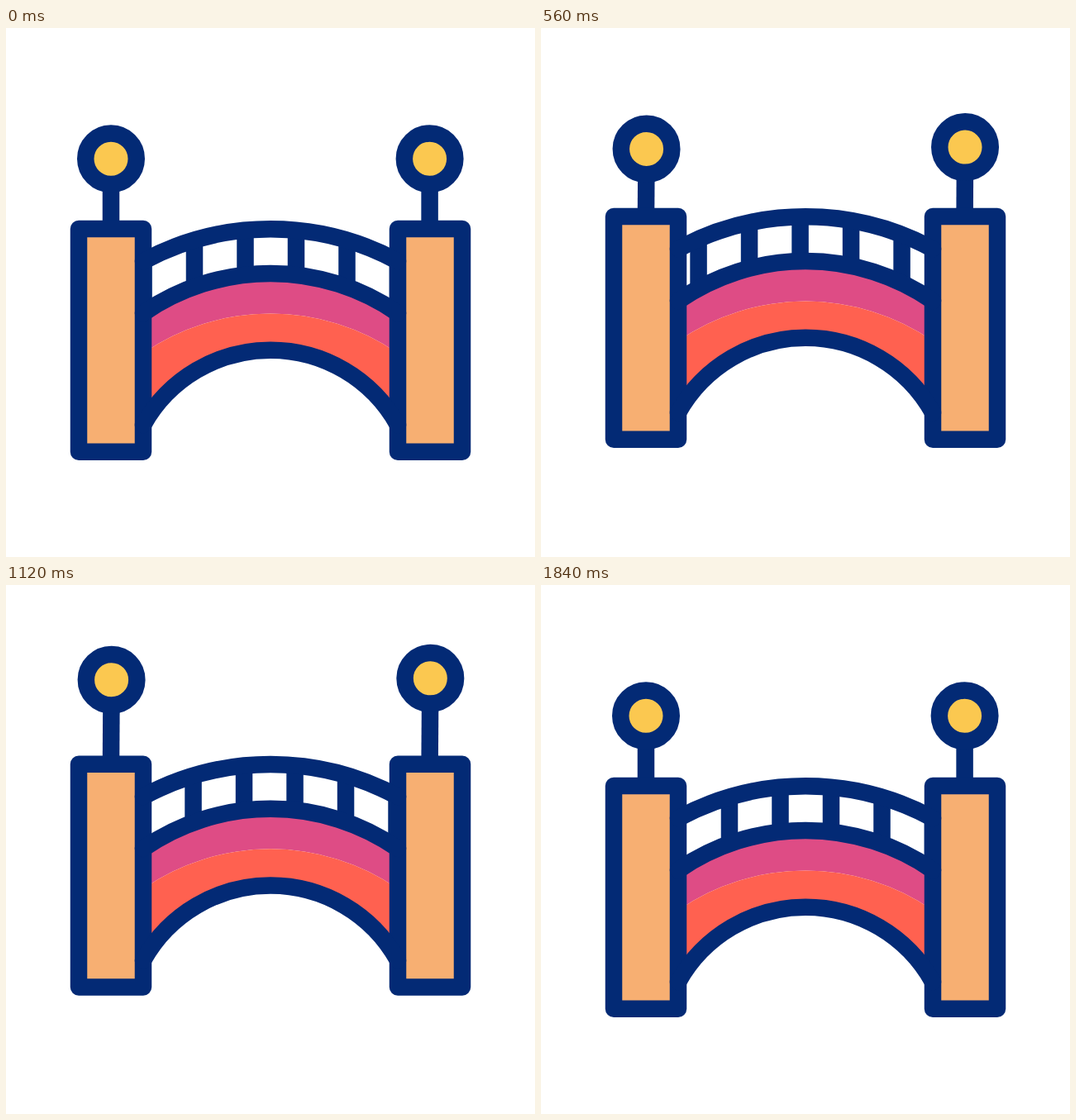
These frames come from a looping animation (640 by 640 pixels, 1880 ms). An HTML page:

```html
<!DOCTYPE html>
<html lang="en">
<head>
<meta charset="utf-8">
<title>Bridge</title>
<style>
html, body { margin: 0; width: 100%; height: 100%; overflow: hidden; background: #fff; }
svg { display: block; width: 100%; height: 100%; }
.line { fill: none; stroke: #032a75; stroke-width: 20.5; stroke-linecap: round; stroke-linejoin: round; }
.bar { stroke-linecap: butt; }
</style>
</head>
<body>
<svg viewBox="0 0 640 640">
  <g id="bridge">
    <g class="lamp"></g>
    <g class="lamp"></g>
    <path id="pink" fill="#de4c85"/>
    <path id="red" fill="#ff6150"/>
    <path id="bars" class="line bar"/>
    <g id="pillars"></g>
    <path id="arcs" class="line"/>
  </g>
</svg>
<script>
const LOOP = 1880, STEP = 40;
const LEFT = 166, RIGHT = 474, MID = 320;
const GAP = 61.5, BAR_STEPS = 4, LIFT = 27;
const LAMP_Y = 158.2, LAMP_BASE = 243, LAMP_LAG = 100;
const find = id => document.getElementById(id);

// Circular arcs, given by the top of the curve and the radius.
const rail = { top: 243.2, r: 323.6 };
const deck = { top: 297, r: 271 };
const stripe = { top: 345.5, r: 271 };
const base = { top: 389.7, r: 176.3 };
const arcY = (arc, x) => arc.top + arc.r - Math.sqrt(arc.r ** 2 - (x - MID) ** 2);
const arcTo = (arc, x, sweep) => `A${arc.r} ${arc.r} 0 0 ${sweep} ${x} ${arcY(arc, x)}`;
const arcPath = arc => `M${LEFT} ${arcY(arc, LEFT)}${arcTo(arc, RIGHT, 1)}`;
const band = (upper, lower) =>
  `${arcPath(upper)}L${RIGHT} ${arcY(lower, RIGHT)}${arcTo(lower, LEFT, 0)}Z`;

find('pink').setAttribute('d', band(deck, stripe));
find('red').setAttribute('d', band(stripe, base));
find('arcs').setAttribute('d', [rail, deck, base].map(arcPath).join(''));
find('pillars').innerHTML = [88, 474].map(x =>
  `<rect class="line" x="${x}" y="243" width="78" height="269.7" style="fill:#f7af72"/>`).join('');

const lamps = [...document.querySelectorAll('.lamp')].map((group, i) => {
  group.innerHTML = '<path class="line bar"/><circle class="line" r="30.75" style="fill:#fbc850"/>';
  return { group, x: [127, 512.6][i], lag: i * LAMP_LAG, stem: group.firstChild, ball: group.lastChild };
});

const progress = (t, from, to) => Math.min(1, Math.max(0, (t - from) / (to - from)));
const easePower = (u, n) => u < .5 ? (2 * u) ** n / 2 : 1 - (2 - 2 * u) ** n / 2;
const smooth = (t, from, to) => {
  const u = progress(t, from, to);
  return u * u * (3 - 2 * u);
};

// Dip, spring up, settle.
const hop = t => 5.2 * smooth(t, 380, 700) - 25.7 * smooth(t, 700, 1070) + 20.5 * smooth(t, 1070, 1270);
const tilt = t => .4 * (smooth(t, 380, 500) - smooth(t, 1070, 1270));

function draw(t) {
  const lift = LIFT * (easePower(progress(t, 108, 975), 2.5) - easePower(progress(t, 1000, 1720), 2.5));
  find('bridge').setAttribute('transform', `translate(0 ${-lift})`);

  const shift = GAP * BAR_STEPS * easePower(t / LOOP, 3.15) % GAP;
  let bars = '';
  for (let i = 0; i < 6; i++) {
    const x = 166.5 + i * GAP + shift;
    bars += `M${x} ${arcY(rail, x)}V${arcY(deck, x)}`;
  }
  find('bars').setAttribute('d', bars);

  for (const { group, x, lag, stem, ball } of lamps) {
    const y = LAMP_Y + hop(t - lag);
    stem.setAttribute('d', `M${x} ${y + 30}V${LAMP_BASE}`);
    ball.setAttribute('cx', x);
    ball.setAttribute('cy', y);
    group.setAttribute('transform', `rotate(${tilt(t - lag)} ${x} ${LAMP_BASE})`);
  }
}

const start = performance.now();
function tick() {
  const t = (performance.now() - start) % LOOP;
  draw(t < 120 ? 0 : Math.floor(t / STEP) * STEP);
  requestAnimationFrame(tick);
}
tick();
</script>
</body>
</html>
```
